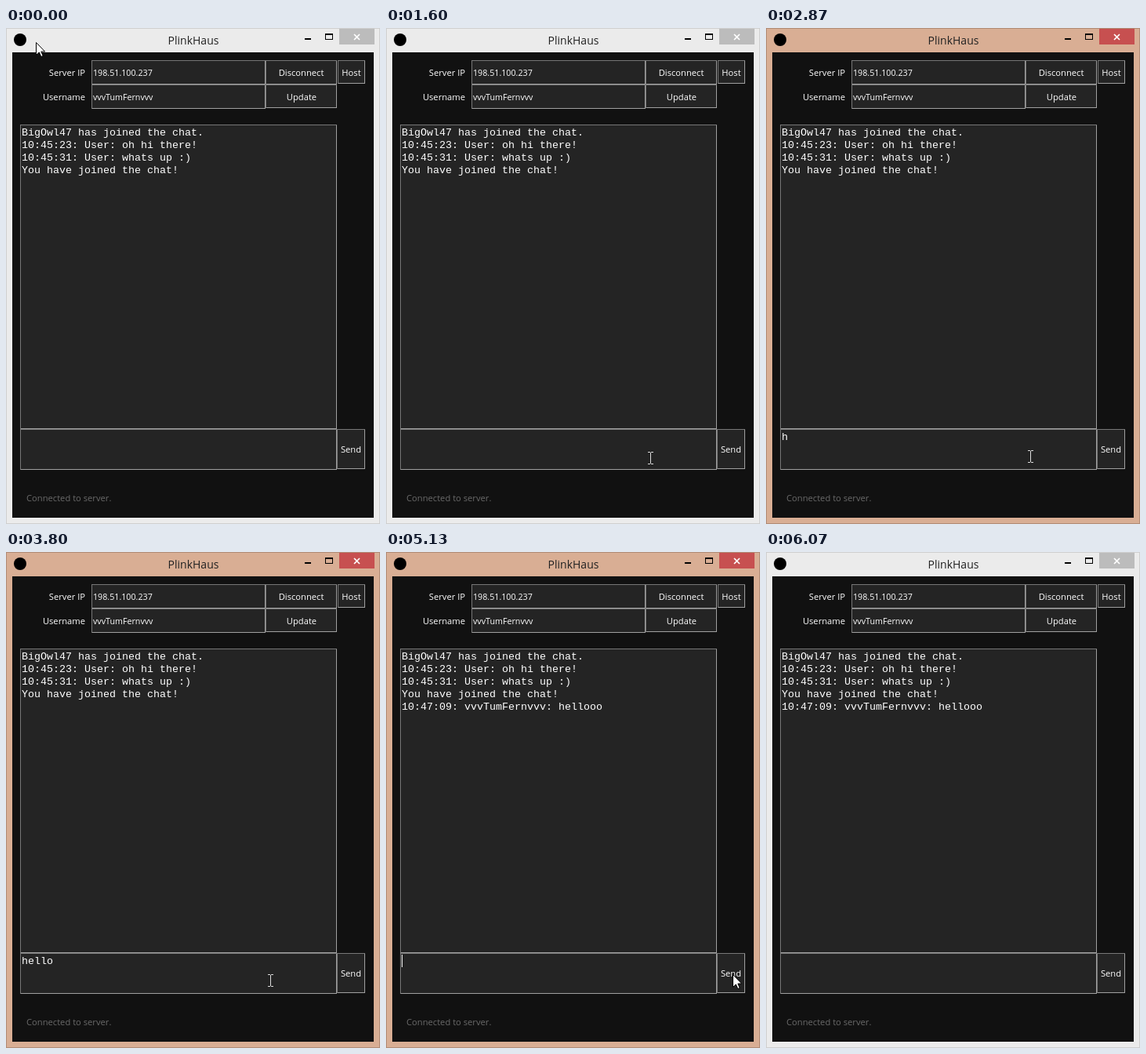
Write an HTML page that moves like this. It is 477 by 632 pixels and loops after 8000 ms.

```html
<!DOCTYPE html>
<html lang="en">
<head>
<meta charset="utf-8">
<title>PlinkHaus</title>
<style>
  html, body { margin: 0; width: 100%; height: 100%; overflow: hidden; }
  svg { display: block; }
  text { font: 11.2px "Open Sans", "Noto Sans", sans-serif; fill: #fff; white-space: pre; }
  .title { font-size: 14px; fill: #222; }
  .entry { font-size: 10.7px; }
  .mono { font: 13.333px "Liberation Mono", "Courier New", monospace; }
  .mid { text-anchor: middle; }
  .end { text-anchor: end; }
  .crisp { shape-rendering: crispEdges; }
</style>
</head>
<body>
<svg width="477" height="632" viewBox="0 0 477 632">
  <rect id="frame" x=".5" y=".5" width="476" height="631"/>
  <circle cx="18" cy="15" r="8"/>
  <text class="title mid" x="239" y="21">PlinkHaus</text>
  <g class="crisp">
    <rect x="381" y="13" width="8" height="2"/>
    <path d="M407 7h10v8h-10zM408 9v5h8v-5z" fill-rule="evenodd"/>
    <rect id="close" x="425" y="1" width="45" height="20"/>
  </g>
  <path d="M444 8l7 7M451 8l-7 7" stroke="#fff" stroke-width="1.7"/>
  <rect x="8" y="31" width="461" height="593" fill="#111"/>
  <g id="boxes" class="crisp"></g>

  <text class="end" x="101" y="61">Server IP</text>
  <text class="end" x="101" y="92">Username</text>
  <text class="entry" x="111" y="61">198.51.100.237</text>
  <text class="entry" x="111" y="92">vvvTumFernvvv</text>
  <text class="mid" x="376.5" y="61">Disconnect</text>
  <text class="mid" x="440.5" y="61">Host</text>
  <text class="mid" x="377" y="92">Update</text>
  <text class="mid" id="send" x="440" y="541">Send</text>
  <text x="26" y="603" style="fill:#6a6a6a">Connected to server.</text>

  <g id="chat"></g>
  <text class="mono" id="input" x="20" y="525"></text>
  <rect id="caret" class="crisp" y="513" width="1" height="16" fill="#fff"/>
  <g id="arrow">
    <path d="M.5 .5V16.5L4.3 13 6.8 18.6 9.2 17.5 6.8 12H11.6Z" fill="#fff" stroke="#000"/>
  </g>
  <path id="beam" class="crisp" d="M-3 -8h3v1h1v-1h3v1h-3v14h3v1h-3v-1h-1v1h-3v-1h3v-14h-3z" fill="#ddd"/>
</svg>
<script>
const $ = id => document.getElementById(id);
const LOOP = 8000, TICK = 1000 / 15;

// Sunken or raised field: x, y, width, height
const box = (x, y, w, h) => `<rect x="${x}" y="${y}" width="${w}" height="${h}" fill="#242424"/>
  <path d="M${x + .5} ${y + h - .5}V${y + .5}H${x + w - .5}" fill="none" stroke="#777"/>
  <path d="M${x + .5} ${y + h - .5}H${x + w - .5}V${y + .5}" fill="none" stroke="#a0a0a0"/>`;
$('boxes').innerHTML = [
  [109, 41, 222, 31], [331, 41, 91, 31], [423, 41, 35, 30],
  [109, 72, 222, 31], [331, 72, 91, 30],
  [18, 123, 404, 388], [18, 511, 404, 52], [422, 511, 36, 51]
].map(b => box(...b)).join('');

$('chat').innerHTML = [
  'BigOwl47 has joined the chat.',
  '10:45:23: User: oh hi there!',
  '10:45:31: User: whats up :)',
  'You have joined the chat!',
  '10:47:09: vvvTumFernvvv: hellooo'
].map((s, i) => `<text class="mono" x="20" y="${137 + 16 * i}">${s}</text>`).join('');
const reply = $('chat').lastElementChild;

const keys = [43, 46, 48, 54, 57, 59, 61];
const caretOn = [[34, 43], [48, 57], [61, 71], [75, 84], [88, 91]];
const lerp = (a, b, p) => a + (b - a) * p;
const move = (x0, y0, x1, y1, p) => [lerp(x0, x1, p), lerp(y0, y1, p)].map(Math.round);

// Pointer hotspot at a tick, or null while it is outside the window
function pointer(n) {
  if (n < 12) return move(38, 18, 286, 523, (Math.max(0, n - 1) / 10) ** 2);
  if (n < 17) return null;
  if (n < 25) return move(466, 377, 337, 548, 1 - (1 - (n - 17) / 7) ** 2);
  if (n < 35) return [337, 548];
  if (n < 71) return [337, 546];
  if (n < 79) return move(417, 541, 442, 538, 1 - (1 - Math.min(1, (n - 71) / 3)) ** 1.5);
  return n < 82 ? [432, 538] : null;
}

const show = (el, on) => el.setAttribute('visibility', on ? 'visible' : 'hidden');

function draw(now) {
  const n = Math.floor((now % LOOP + 5) / TICK) % 120;
  const active = n >= 34 && n < 91;
  $('frame').setAttribute('fill', active ? '#d9ae94' : '#ebebeb');
  $('frame').setAttribute('stroke', active ? '#b08c77' : '#cfcfcf');
  $('close').setAttribute('fill', active ? '#c75050' : '#bcbcbc');

  const typed = n < 76 ? keys.filter(k => k <= n).length : 0;
  $('input').textContent = 'hellooo'.slice(0, typed);
  $('caret').setAttribute('x', 20 + 8 * typed);
  show($('caret'), caretOn.some(([a, b]) => n >= a && n < b));
  show(reply, n >= 77);
  $('send').setAttribute('transform', n === 75 ? 'translate(1 1)' : '');

  const at = pointer(n);
  const overText = at && at[0] > 18 && at[0] < 422 && at[1] > 123 && at[1] < 563;
  show($('beam'), overText);
  show($('arrow'), at && !overText);
  if (at) for (const id of ['beam', 'arrow']) $(id).setAttribute('transform', `translate(${at})`);
}

let start;
function loop(now) {
  start ??= now;
  draw(now - start);
  requestAnimationFrame(loop);
}
draw(0);
requestAnimationFrame(loop);
</script>
</body>
</html>
```
